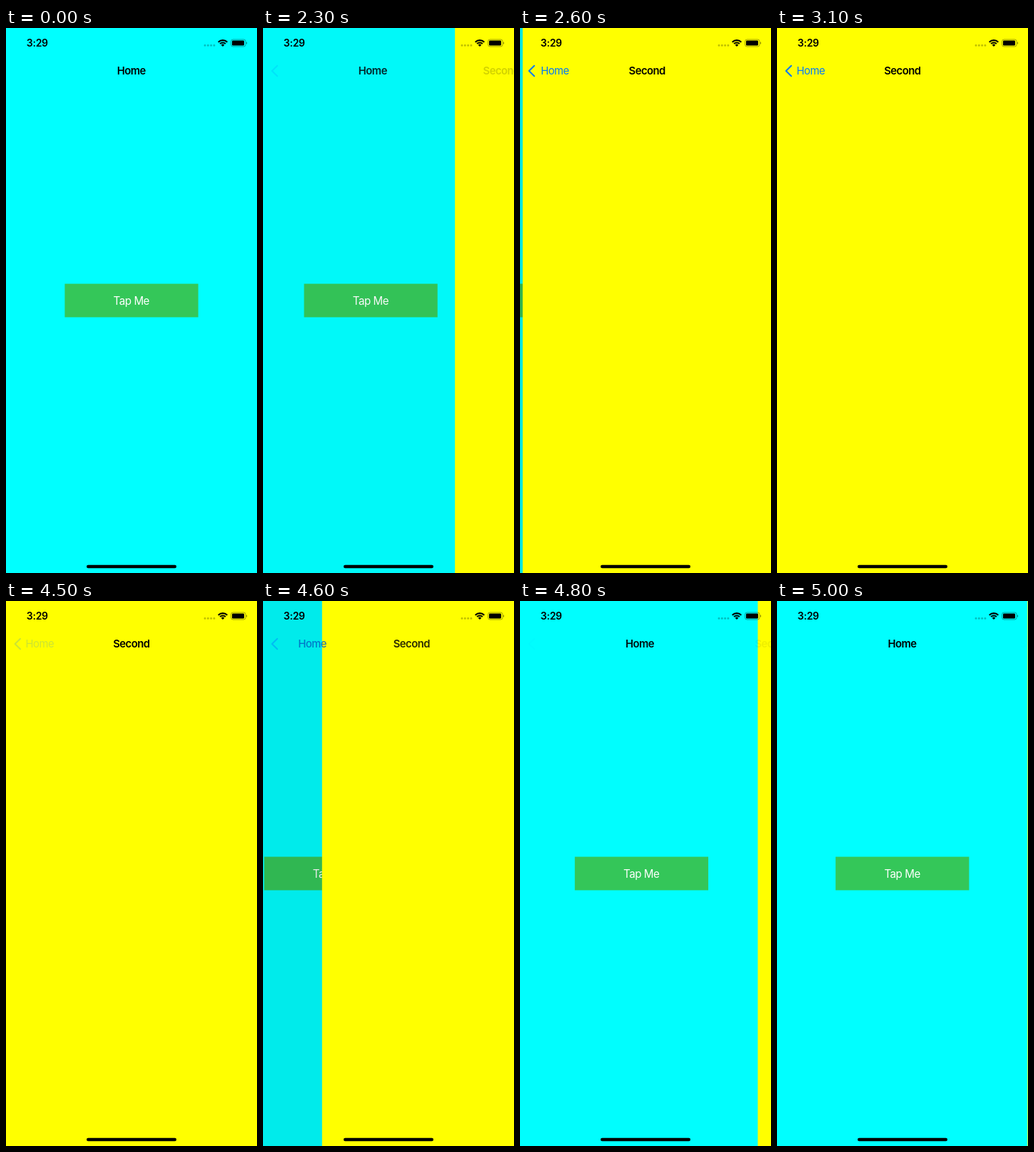
An HTML page that plays this animation: 352 px wide and 762 px high, repeating every 5.1 s.

```html
<!DOCTYPE html>
<html>
<head>
<meta charset="utf-8">
<style>
html, body { margin: 0; height: 100%; overflow: hidden; }
svg { display: block; width: 100vw; height: 100vh; }
text { font: 14.8px Inter, sans-serif; letter-spacing: -.5px; text-anchor: middle; }
.bold { font-weight: 600; }
</style>
</head>
<body>
<svg viewBox="0 0 352 762">
  <g id="home">
    <rect width="352" height="762" fill="#0ff"/>
    <rect x="82.4" y="357.6" width="187.2" height="46.8" fill="#34c759"/>
    <text x="175.8" y="386.7" fill="#fff" style="font-size:15.2px">Tap Me</text>
    <rect id="dim" width="352" height="762"/>
  </g>
  <rect id="second" width="352" height="762" fill="#ff0"/>

  <g id="back">
    <path id="chevron" d="M20 52.8L12.6 60L20 67.2" fill="none" stroke="#007aff" stroke-width="2" stroke-linecap="round" stroke-linejoin="round"/>
    <text id="backLabel" x="47.3" y="65" fill="#007aff">Home</text>
  </g>
  <text id="homeTitle" class="bold" x="175.8" y="65">Home</text>
  <text id="secondTitle" class="bold" x="175.8" y="65">Second</text>

  <text class="bold" x="43.8" y="26" style="font-size:14px;letter-spacing:-.3px">3:29</text>
  <path d="M279 24.2h13" stroke="#000" stroke-opacity=".25" stroke-width="3" stroke-linecap="round" stroke-dasharray="0 4.3"/>
  <g fill="none" stroke="#000" stroke-width="2.1">
    <path d="M297.7 19.7a8.9 8.9 0 0 1 12.6 0"/>
    <path d="M300.1 22.1a5.5 5.5 0 0 1 7.8 0"/>
    <path d="M301.7 23.7a3.2 3.2 0 0 1 4.6 0L304 26z" fill="#000" stroke="none"/>
  </g>
  <rect x="315.6" y="16" width="20.4" height="10" rx="2.8" fill="none" stroke="#000" stroke-opacity=".4" stroke-width=".9"/>
  <rect x="317" y="17.4" width="17" height="7.2" rx="1.4"/>
  <path d="M336.9 19.3q1.3 .5 1.3 1.7t-1.3 1.7z" fill-opacity=".45"/>
  <rect x="113" y="750.8" width="126" height="4.5" rx="2.25"/>
</svg>
<script>
const LOOP = 5100, STEP = 100, PUSH = 2251, PRESS = 4500, POP = 4551, TITLE_LAG = 9.5;
const el = id => document.getElementById(id);
const [home, dim, second, back, chevron, backLabel, homeTitle, secondTitle] =
  ['home', 'dim', 'second', 'back', 'chevron', 'backLabel', 'homeTitle', 'secondTitle'].map(el);

// Critically damped spring: distance left after ms
function left(ms) {
  const u = Math.max(0, ms) * 0.0188;
  return (1 + u) * Math.exp(-u);
}

const progress = t => t < PRESS ? 1 - left(t - PUSH) : left(t - POP);

function place(node, x, opacity = 1) {
  node.setAttribute('transform', `translate(${x.toFixed(2)} 0)`);
  node.setAttribute('opacity', opacity);
}

function draw(t) {
  const p = progress(t), q = progress(t - (t < PRESS || t >= POP ? TITLE_LAG : 0));
  place(home, -105.6 * p);
  dim.setAttribute('opacity', 0.1 * p);
  place(second, 352 * (1 - p));
  place(homeTitle, -128.5 * q, 1 - q);
  place(backLabel, 128.5 * (1 - q), q);
  place(secondTitle, 191 * (1 - q), q);
  place(chevron, 0, t > PRESS ? q * 0.5 : q);
  back.setAttribute('opacity', t === PRESS ? 0.2 : 1);
}

function tick(now) {
  draw(Math.floor(now % LOOP / STEP) * STEP);
  requestAnimationFrame(tick);
}
draw(0);
requestAnimationFrame(tick);
</script>
</body>
</html>
```
